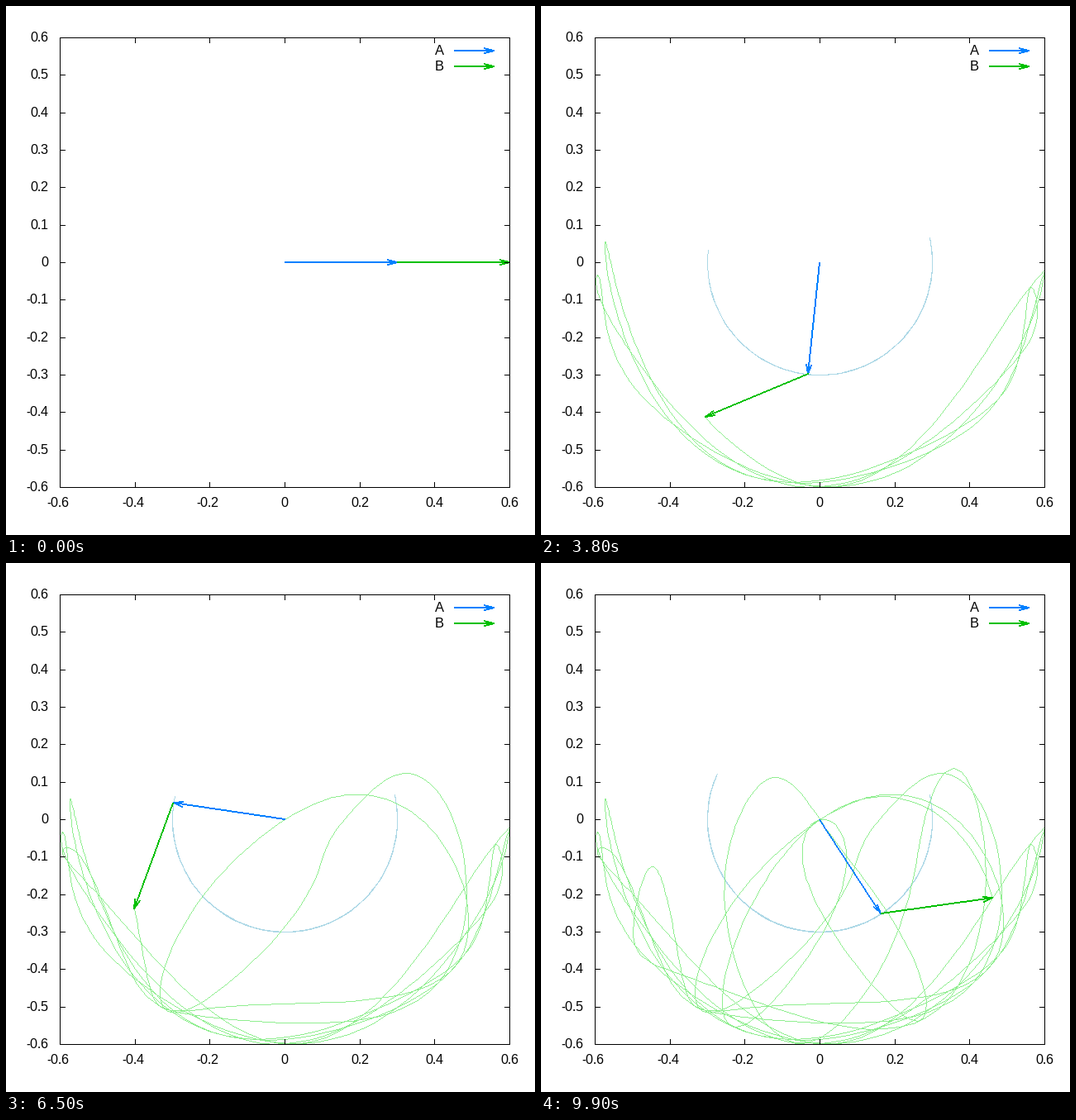
A matplotlib script for the animation above (10 s loop, 640 px wide and 640 px high).

```python
import numpy as np
import matplotlib.pyplot as plt
from matplotlib.animation import FuncAnimation

SIZE, DPI = 640, 100
FRAMES, INTERVAL = 100, 100
STEPS, STRIDE = 100, 10         # integration steps per frame, steps per trail point
DT = INTERVAL / 1000 / STEPS
G, L1, L2, M1, M2 = 9.8, 0.3, 0.3, 1.0, 1.0
LEFT, TOP, SIDE = 65, 38, 544   # plot box in pixels
RIGHT, BOTTOM = LEFT + SIDE, TOP + SIDE
BLUE, GREEN = (0, 128, 255), (0, 192, 0)
PALE_BLUE, PALE_GREEN = (173, 216, 230), (144, 238, 144)
BLACK = (0, 0, 0)

plt.rcParams.update({"font.family": "Liberation Sans",
                     "font.size": 16 * 72 / DPI,
                     "text.hinting": "default", "text.hinting_factor": 1})


def deriv(s):
    a, b, u, v = s
    d = a - b
    c, n = np.cos(d), np.sin(d)
    m = M1 + M2
    p = -M2 * L2 * v * v * n - m * G * np.sin(a)
    q = L1 * u * u * n - G * np.sin(b)
    k = M1 + M2 * n * n
    return np.array([u, v, (p - M2 * c * q) / (L1 * k),
                     (m * q - c * p) / (L2 * k)])


def simulate():
    """Double pendulum released from horizontal, integrated with RK4."""
    s = np.array([np.pi / 2, np.pi / 2, 0.0, 0.0])
    out = [s]
    for _ in range((FRAMES - 1) * STEPS):
        k1 = deriv(s)
        k2 = deriv(s + DT / 2 * k1)
        k3 = deriv(s + DT / 2 * k2)
        k4 = deriv(s + DT * k3)
        s = s + DT / 6 * (k1 + 2 * k2 + 2 * k3 + k4)
        out.append(s)
    return np.array(out[::STRIDE])


def snap(v):
    return np.floor(np.asarray(v) + 0.5).astype(int)


def to_px(x, y):
    return snap(np.column_stack([LEFT + (x + 0.6) / 1.2 * SIDE,
                                 TOP + (0.6 - y) / 1.2 * SIDE]))


def draw_line(img, p, q, color, width=1):
    """Crisp line: one run of `width` pixels per step along the longer axis."""
    p, q = snap(p), snap(q)
    d = np.abs(q - p)
    pts = snap(np.linspace(p, q, d.max() + 1))
    minor = 1 if d[0] >= d[1] else 0
    for k in range(width):
        x, y = (pts + (k - width // 2) * np.eye(2, dtype=int)[minor]).T
        ok = (x >= LEFT) & (x <= RIGHT) & (y >= TOP) & (y <= BOTTOM)
        img[y[ok], x[ok]] = color


def draw_path(img, pts, color):
    for p, q in zip(pts[:-1], pts[1:]):
        draw_line(img, p, q, color)


def draw_arrow(img, p, q, color, head=12):
    """Shaft with two open barbs at 15 degrees."""
    p, q = np.array(p), np.array(q)
    draw_line(img, p, q, color, 2)
    dx, dy = (p - q) / np.hypot(*(p - q)) * head
    c = np.cos(np.pi / 12)
    for s in (np.sin(np.pi / 12), -np.sin(np.pi / 12)):
        draw_line(img, q + [c * dx - s * dy, s * dx + c * dy], q, color, 2)


def draw_box(img):
    corners = [(LEFT, TOP), (RIGHT, TOP), (RIGHT, BOTTOM), (LEFT, BOTTOM), (LEFT, TOP)]
    draw_path(img, corners, BLACK)
    for y in Y_TICKS:
        draw_line(img, (LEFT, y), (LEFT + 6, y), BLACK)
        draw_line(img, (RIGHT - 6, y), (RIGHT, y), BLACK)
    for x in X_TICKS:
        draw_line(img, (x, TOP), (x, TOP + 6), BLACK)
        draw_line(img, (x, BOTTOM - 6), (x, BOTTOM), BLACK)


X_TICKS = snap(np.linspace(LEFT, RIGHT, 7))
Y_TICKS = snap(np.linspace(TOP, BOTTOM, 13))
KEY = (("A", BLUE, 54), ("B", GREEN, 73))

th = simulate()
xa, ya = L1 * np.sin(th[:, 0]), -L1 * np.cos(th[:, 0])
tip_a = to_px(xa, ya)
tip_b = to_px(xa + L2 * np.sin(th[:, 1]), ya - L2 * np.cos(th[:, 1]))
pivot = to_px(0, 0)[0]

fig = plt.figure(figsize=(SIZE / DPI, SIZE / DPI), dpi=DPI, facecolor="white")
ax = fig.add_axes([0, 0, 1, 1])
ax.axis("off")
blank = np.full((SIZE, SIZE, 3), 255, np.uint8)
canvas = ax.imshow(blank, extent=(0, SIZE, SIZE, 0), interpolation="nearest",
                   aspect="auto")

for i, y in enumerate(Y_TICKS):
    ax.text(51, y + 5, f"{(6 - i) / 10:g}", ha="right", va="baseline")
for i, x in enumerate(X_TICKS):
    v = (2 * i - 6) / 10
    ax.text(x - 2.5 * (v < 0), 606, f"{v:g}", ha="center", va="baseline")
for name, _, y in KEY:
    ax.text(530, y + 5, name, ha="right", va="baseline")


def update(i):
    n = i * STEPS // STRIDE
    img = blank.copy()
    draw_path(img, tip_a[:n + 1], PALE_BLUE)
    draw_path(img, tip_b[:n + 1], PALE_GREEN)
    draw_arrow(img, pivot, tip_a[n], BLUE)
    draw_arrow(img, tip_a[n], tip_b[n], GREEN)
    for _, color, y in KEY:
        draw_arrow(img, (542, y), (590, y), color)
    draw_box(img)
    canvas.set_data(img)
    return [canvas]


anim = FuncAnimation(fig, update, frames=FRAMES, interval=INTERVAL,
                     init_func=lambda: update(0), repeat=True,
                     repeat_delay=0, blit=False)
plt.show()
```
